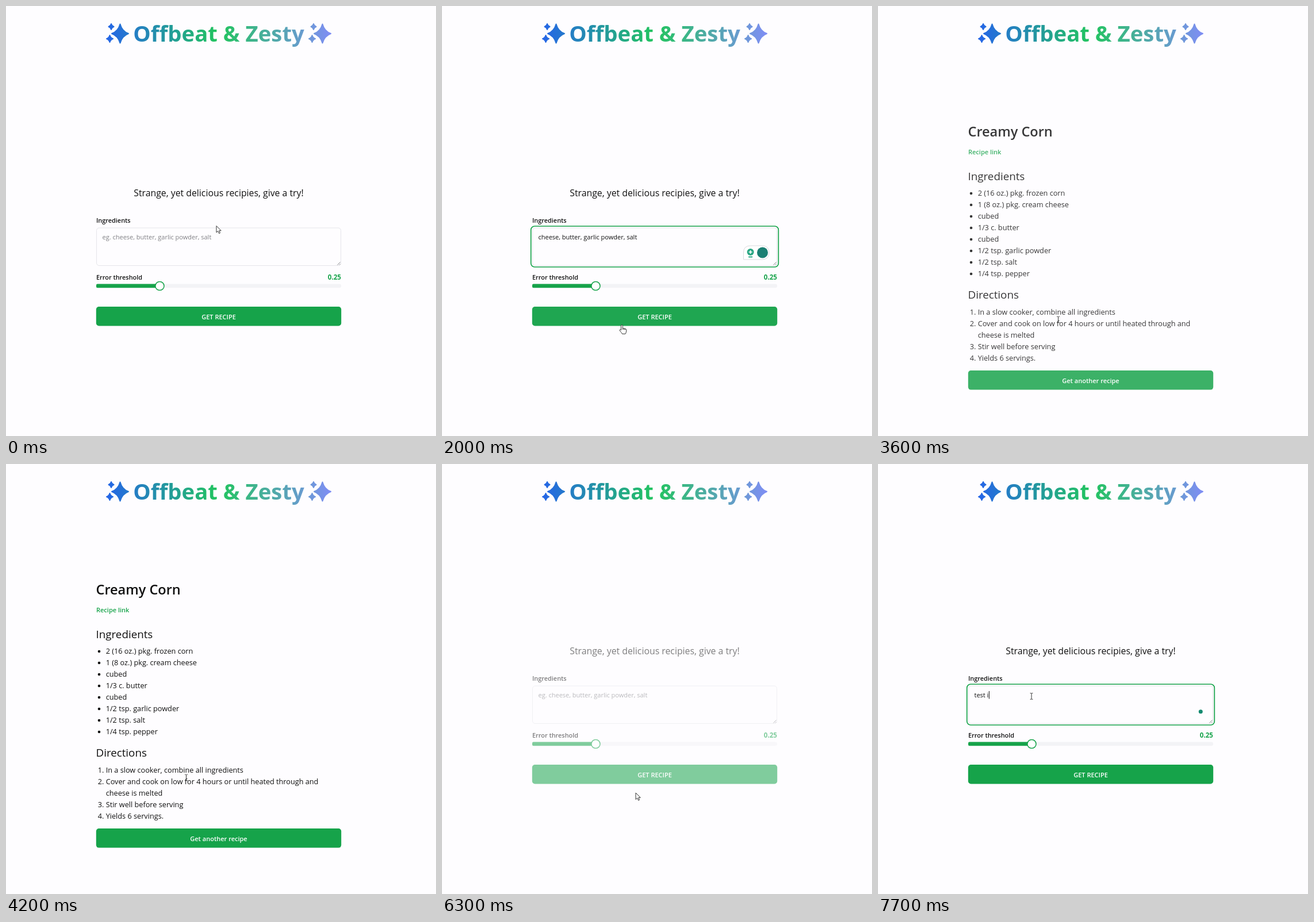
Write an HTML page that moves like this. It is 748 by 748 pixels and loops after 8 s.

```html
<!DOCTYPE html>
<html lang="en">
<head>
<meta charset="utf-8">
<title>Recipe finder</title>
<style>
  html, body { margin: 0; width: 100%; height: 100%; overflow: hidden; background: #fefdff; }
  svg { display: block; width: 100vw; height: 100vh; }
  text { font-family: "Open Sans", "Noto Sans", sans-serif; fill: #111; white-space: pre; }
  .title { font-size: 38.3px; font-weight: 700; fill: url(#brand); }
  .lead { font-size: 15.83px; }
  .label { font-size: 10.9px; font-weight: 600; }
  .field { font-size: 11px; }
  .muted { fill: #808085; }
  .value { font-size: 11.6px; font-weight: 700; }
  .link { font-size: 11px; font-weight: 600; }
  .green { fill: #16a34a; }
  .button { font-size: 11px; font-weight: 600; fill: #fff; }
  .name { font-size: 23.5px; font-weight: 600; }
  .head { font-size: 18.8px; }
  .item { font-size: 12.7px; }
  .mid { text-anchor: middle; }
  .end { text-anchor: end; }
  .cursor path { fill: #fff; stroke: #333; stroke-width: 1; stroke-linejoin: round; }
  .cursor .line { fill: none; }
</style>
</head>
<body>
<svg viewBox="0 0 748 748">
  <defs>
    <linearGradient id="brand" gradientUnits="userSpaceOnUse" x1="170" y1="0" x2="570" y2="0">
      <stop offset="0" stop-color="#2563eb"/>
      <stop offset=".5" stop-color="#22c55e"/>
      <stop offset="1" stop-color="#818cf8"/>
    </linearGradient>
  </defs>

  <text class="title mid" x="370" y="62">Offbeat &amp; Zesty</text>
  <path id="stars" fill="url(#brand)" stroke="url(#brand)" stroke-width="2" stroke-linejoin="round"/>

  <g id="form">
    <text class="lead mid" x="370" y="331">Strange, yet delicious recipies, give a try!</text>
    <text class="label" x="157" y="377">Ingredients</text>
    <rect x="157.5" y="386" width="425" height="65.5" rx="4.5" fill="#fefdff" stroke="#e5e5ea"/>
    <rect id="ring" x="154.7" y="383" width="430.6" height="71" rx="6.5" fill="none" stroke="#16a34a" stroke-width="1.7"/>
    <path d="M576.5 450.5l5-5M579.8 450.5l1.7-1.7" stroke="#77777c" stroke-width=".9"/>
    <text id="hint" class="field muted" x="167.5" y="406">eg. cheese, butter, garlic powder, salt</text>
    <text id="typed" class="field" x="167.5" y="406"></text>
    <rect id="caret" y="395" width="1" height="13.5" fill="#111"/>
    <text class="label" x="157" y="475.7">Error threshold</text>
    <text class="value green end" x="583" y="475.7">0.25</text>
    <rect x="157" y="483.6" width="426" height="6.6" rx="3.3" fill="#f3f3f6"/>
    <path d="M267 483.6H159a2 2 0 0 0-2 2v2.6a2 2 0 0 0 2 2h108z" fill="#16a34a"/>
    <circle cx="267.4" cy="487" r="7.6" fill="#fff" stroke="#16a34a" stroke-width="1.5"/>
    <rect class="hover green" x="156.8" y="523" width="426.4" height="33.5" rx="4.8"/>
    <text class="button mid" x="370" y="545">GET RECIPE</text>
  </g>

  <circle id="dot" cx="561.3" cy="430.7" r="3.5" fill="#148a70"/>
  <g id="pill">
    <path d="M524.5 441v-12q0-12 12-12h20q12.5 0 12.5 12t-12.5 12z" fill="#fff" stroke="#d9d9de"/>
    <circle cx="536.6" cy="428" r="6" fill="#2aa784"/>
    <path d="M536.6 425v6M533.6 428h6" stroke="#fff" stroke-width="1.7"/>
    <path d="M534 436.5h5.2" stroke="#2aa784" stroke-width="2.2" stroke-linecap="round"/>
    <circle cx="557.5" cy="429" r="9.5" fill="#1b7f73"/>
  </g>

  <g id="recipe">
    <text class="name" x="156.5" y="227">Creamy Corn</text>
    <text class="link green" x="157" y="258">Recipe link</text>
    <text class="head" x="156.5" y="303">Ingredients</text>
    <text class="head" x="156.5" y="509">Directions</text>
    <g id="lists"></g>
    <rect class="hover green" x="156.8" y="634" width="426.4" height="33.6" rx="4.8"/>
    <text class="button mid" x="370" y="655.5">Get another recipe</text>
  </g>

  <g id="cursor" class="cursor">
    <g id="arrow"><path d="M0 0V11.5L2.7 9L4.6 13.2L6.5 12.3L4.7 8.3H8.2Z"/></g>
    <g id="hand">
      <path d="M-1.5 1.3a1.4 1.4 0 0 1 2.8 0V5.5l5 1.1q1.7.5 1.6 2.2l-.7 4q-.2 1.2-1.2 2.6h-5.6q-.6-1.7-2-3.1l-2.4-2.9q-.4-1 .5-1.5.9-.2 2 1z"/>
      <path class="line" d="M1.3 5.5v2.7M3.6 6v2.3M5.8 6.5v2"/>
    </g>
    <g id="beam"><path class="line" d="M-2.4-5.3h1.5L0-4.6L.9-5.3H2.4M0-4.6V4.6M-2.4 5.3h1.5L0 4.6L.9 5.3H2.4"/></g>
  </g>
</svg>
<script>
const LOOP = 8000, STEP = 100;
const $ = id => document.getElementById(id);
const hovers = document.querySelectorAll('.hover');

function star(x, y, rx, ry) {
  const kx = rx * .24, ky = ry * .24;
  return `M${x} ${y - ry}Q${x + kx} ${y - ky} ${x + rx} ${y}Q${x + kx} ${y + ky} ${x} ${y + ry}` +
         `Q${x - kx} ${y + ky} ${x - rx} ${y}Q${x - kx} ${y - ky} ${x} ${y - ry}Z`;
}
$('stars').setAttribute('d', [0, 352].map(dx =>
  star(198.5 + dx, 48, 14.5, 16.5) + star(183 + dx, 36, 4.5, 5) + star(180.5 + dx, 57, 5.5, 6)).join(''));

const foods = ['2 (16 oz.) pkg. frozen corn', '1 (8 oz.) pkg. cream cheese', 'cubed', '1/3 c. butter',
  'cubed', '1/2 tsp. garlic powder', '1/2 tsp. salt', '1/4 tsp. pepper'];
const steps = [['1.', 'In a slow cooker, combine all ingredients'],
  ['2.', 'Cover and cook on low for 4 hours or until heated through and'], ['', 'cheese is melted'],
  ['3.', 'Stir well before serving'], ['4.', 'Yields 6 servings.']];
const line = (s, y) => `<text class="item" x="173.7" y="${y}">${s}</text>`;
$('lists').innerHTML =
  foods.map((s, i) => `<circle cx="162" cy="${326 + 20 * i}" r="2.3" fill="#111"/>` + line(s, 330 + 20 * i)).join('') +
  steps.map(([n, s], i) => `<text class="item end" x="170.3" y="${536.5 + 20 * i}">${n}</text>` + line(s, 536.5 + 20 * i)).join('');

// Each track lists [time, value]; values between keys are linear.
const tracks = {
  form: [[3050, 1], [3300, 0], [6150, 0], [6430, 1]],
  recipe: [[3350, 0], [3650, 1], [5950, 1], [6150, 0]],
  hover: [[1900, 0], [2150, 1], [3300, 1], [3350, 0], [4950, 0], [5200, 1], [6140, 1], [6150, 0],
    [6350, 0], [6500, 1], [6700, 0]]
};
const path = [[100, 366, 382.5], [500, 262, 404], [1100, 262, 404], [1700, 308, 582], [1800, 312, 562],
  [2000, 313, 555], [2300, 313.5, 545.5], [4400, 313.5, 545.5], [5200, 367, 645], [6000, 367, 645],
  [6300, 337, 572], [6700, 275, 412], [6800, 267, 404]];

function at(keys, t, k = 1) {
  const i = keys.findIndex(key => key[0] > t);
  if (i === 0) return keys[0][k];
  if (i < 0) return keys[keys.length - 1][k];
  const a = keys[i - 1], b = keys[i];
  return a[k] + (b[k] - a[k]) * (t - a[0]) / (b[0] - a[0]);
}

// [text, first key, last key, start, end]
const entries = [['cheese, butter, garlic powder, salt', 500, 1500, 0, 6000], ['test i', 7100, 7700, 6000, LOOP]];
const within = (t, a, b) => t >= a && t < b;
const show = (id, on) => $(id).style.display = on ? '' : 'none';

function cursorKind(t, x, y) {
  const isForm = t < 3350 || t >= 6150;
  if (x < 157 || x > 583) return 'arrow';
  const [top, bottom] = isForm ? [523, 556.5] : [634, 667.5];
  if (y >= top && y <= bottom) return 'hand';
  const [from, to] = isForm ? [386, 452] : [522, 620];
  return y >= from && y <= to ? 'beam' : 'arrow';
}

function draw(t) {
  const form = at(tracks.form, t);
  $('form').style.opacity = form;
  $('recipe').style.opacity = at(tracks.recipe, t);
  hovers.forEach(b => b.style.opacity = 1 - .1 * at(tracks.hover, t));

  const [text, first, last] = entries.find(e => within(t, e[3], e[4]));
  const part = Math.min(1, Math.max(0, (t - first) / (last - first)));
  const typed = text.slice(0, Math.floor(part * text.length + 1e-6));
  $('typed').textContent = typed;
  show('hint', !typed);

  const focused = within(t, 400, 2900) || t >= 6800;
  const blinkOn = t < last || (t - last) % 1000 < 500;
  show('ring', focused);
  show('caret', focused && blinkOn);
  $('caret').setAttribute('x', 168 + (typed ? $('typed').getComputedTextLength() : 0));

  show('dot', within(t, 700, 1700) || t >= 7000);
  show('pill', within(t, 1700, 3350));
  $('pill').style.opacity = Math.pow(form, .4);

  const x = at(path, t, 1), y = at(path, t, 2), kind = cursorKind(t, x, y);
  $('cursor').setAttribute('transform', `translate(${x} ${y})`);
  for (const id of ['arrow', 'hand', 'beam']) show(id, id === kind);
}

const start = performance.now();
function tick() {
  const t = (performance.now() - start) % LOOP;
  draw(Math.floor(t / STEP) * STEP);
  requestAnimationFrame(tick);
}
tick();
</script>
</body>
</html>
```
